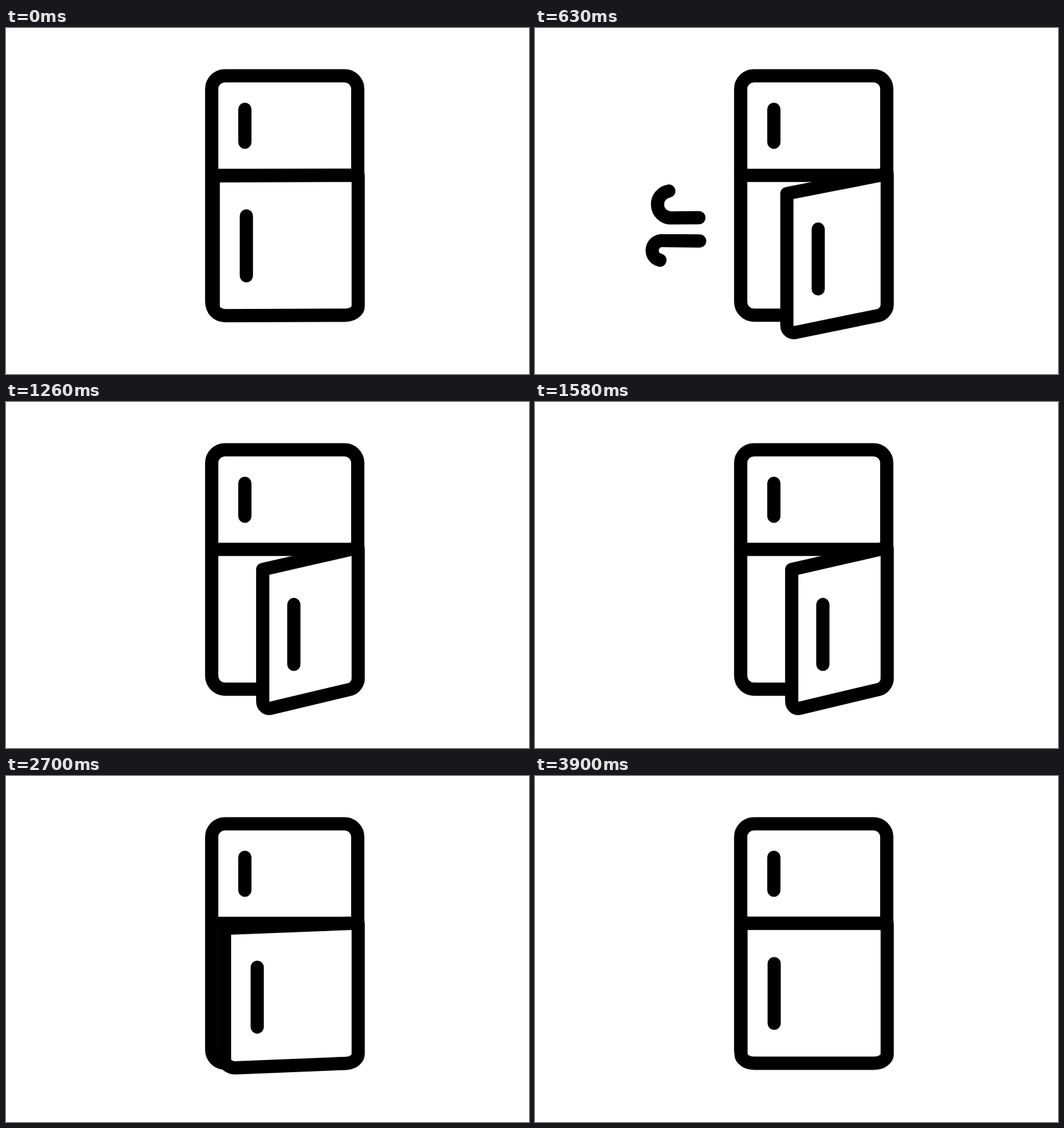
These frames come from a looping animation (820 px wide and 542 px high, 3980 ms). An HTML page:

```html
<!DOCTYPE html>
<html lang="en">
<head>
<meta charset="utf-8">
<title>Fridge</title>
<style>
  html, body { margin: 0; width: 100%; height: 100%; overflow: hidden; background: #fff; }
  svg { display: block; width: 100%; height: 100%; }
  svg * { fill: none; stroke: #000; stroke-width: 20.7; stroke-linecap: round; stroke-linejoin: round; }
  #body, #door { fill: #fff; }
</style>
</head>
<body>
<svg viewBox="0 0 820 542">
  <rect id="body" x="322.5" y="74.8" width="229" height="375" rx="20.7"/>
  <path d="M323 230.8H551.5M374.5 127.3V179"/>
  <path id="door"/>
  <path id="handle" d="M375 293.8V387.5"/>
  <path class="wind" pathLength="1" d="M288.5 297L214 297.5A21 21 0 0 1 212.5 255.2"/>
  <path class="wind" pathLength="1" d="M289 334L200 333A15.5 15.5 0 0 0 198.5 364"/>
</svg>
<script>
const LOOP = 3980;
const CLOSED = 323, TRAVEL = 79.5, HINGE = 541, RIGHT = 552.2;

// Moments at which the picture is redrawn: first, last, count.
const stops = [
  [0, 0, 1], [90, 560, 7], [630, 1110, 7], [1190, 1580, 6],
  [2150, 2620, 7], [2700, 3090, 6], [3900, 3900, 1]
].flatMap(([from, to, n]) => Array.from({ length: n }, (_, i) =>
  n < 2 ? from : Math.round((from + (to - from) * i / (n - 1)) / 10) * 10));

const door = document.getElementById('door');
const handle = document.getElementById('handle');
const winds = document.querySelectorAll('.wind');

function ease(t, start, duration) {
  const u = Math.min(1, Math.max(0, (t - start) / duration));
  return (1 - Math.cos(Math.PI * u)) / 2;
}

function drawDoor(open) {
  const left = CLOSED + TRAVEL * open;
  const edge = (y, drop) => x => y + drop * open * (HINGE - x) / (HINGE - left);
  const top = edge(230.8, 31.5), bottom = edge(449.8, 33);
  const rx = 20 * (RIGHT - left) / (RIGHT - CLOSED), ry = 14, k = 0.45;
  const on = x => `${x} ${bottom(x)}`;
  const above = (x, d) => `${x} ${bottom(x) - d}`;
  door.setAttribute('d',
    `M${left} ${top(left)}L${above(left, ry)}` +
    `C${above(left, ry * k)} ${on(left + rx * k)} ${on(left + rx)}` +
    `L${on(RIGHT - rx)}` +
    `C${on(RIGHT - rx * k)} ${above(RIGHT, ry * k)} ${above(RIGHT, ry)}` +
    `L${RIGHT} ${top(RIGHT)}Z`);
  handle.setAttribute('transform', `translate(${0.96 * TRAVEL * open} ${23.4 * open})`);
}

function drawWind(tail, head) {
  const length = head - tail;
  for (const wind of winds) {
    wind.style.display = length > 0.001 ? '' : 'none';
    wind.style.strokeDasharray = `${length} 3`;
    wind.style.strokeDashoffset = -tail;
  }
}

function draw(now) {
  const time = now % LOOP;
  const t = stops.findLast(stop => stop <= time);
  drawDoor(t < 3900 ? ease(t, -90, 900) - ease(t, 2085, 920) : 0);
  drawWind(ease(t, 470, 510), t < 3900 ? ease(t, 325, 335) : 1);
}

const begin = performance.now();
function tick() {
  draw(performance.now() - begin);
  requestAnimationFrame(tick);
}
tick();
</script>
</body>
</html>
```
